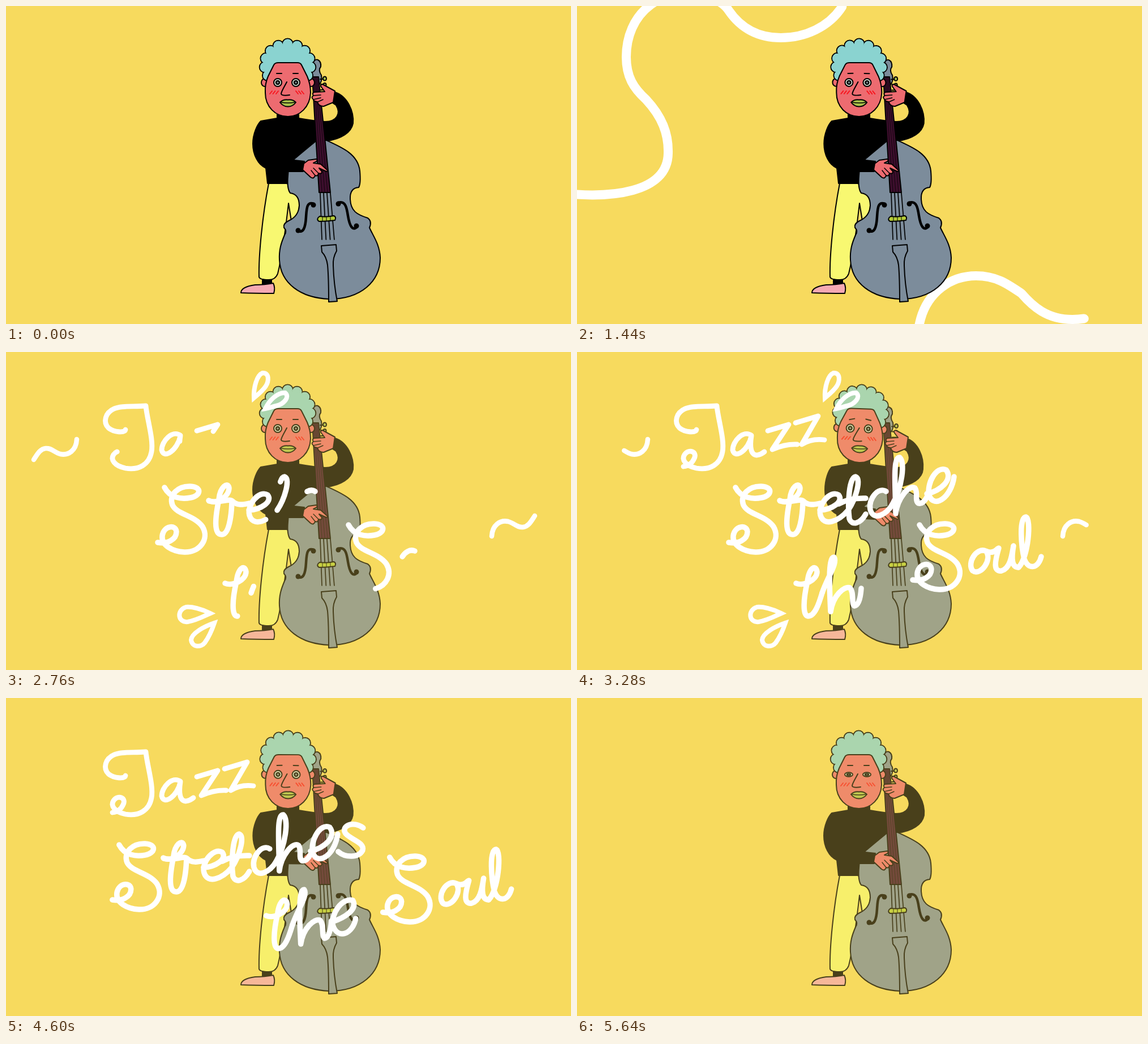
An HTML page with a canvas that plays this animation: 998x561 px, repeating every 5680 ms.

```html
<!DOCTYPE html>
<html lang="en">
<head>
<meta charset="utf-8">
<title>Jazz Stretches the Soul</title>
<style>
html, body { margin: 0; width: 100%; height: 100%; overflow: hidden; background: #f7da5e; }
canvas { display: block; width: 998px; height: 561px; }
</style>
</head>
<body>
<canvas id="stage" width="998" height="561" role="img" aria-label="Jazz Stretches the Soul"></canvas>
<script>
const W = 998, H = 561, LOOP = 5680;
const INK = '#000', SKIN = '#ed6b70', GREY = '#7c8c9b', LIME = '#a8c04a', HAIR = '#8ad3d0';
const ctx = document.getElementById('stage').getContext('2d');
const layer = document.createElement('canvas');
layer.width = W; layer.height = H;
const man = layer.getContext('2d');

const clamp = x => Math.max(0, Math.min(1, x));
const smooth = x => { x = clamp(x); return x * x * (3 - 2 * x); };
const span = (t, a, b) => clamp((t - a) / (b - a));

// Smooth interpolation through [time, value] pairs
function keys(t, list) {
  let [a, v] = list[0];
  for (const [b, w] of list) {
    if (t <= b) return b === a ? w : v + (w - v) * smooth((t - a) / (b - a));
    a = b; v = w;
  }
  return v;
}

function measure(d) {
  const el = document.createElementNS('http://www.w3.org/2000/svg', 'path');
  el.setAttribute('d', d);
  return el.getTotalLength();
}
const stroke = d => ({ path: new Path2D(d), len: measure(d) });

// Draws the part of a stroke between two lengths
function trim(s, from, to, width) {
  from = Math.max(0, from); to = Math.min(s.len, to);
  if (to - from < 0.5) return;
  ctx.lineWidth = width;
  if (from > 0 || to < s.len) {
    ctx.setLineDash([to - from, s.len * 2]);
    ctx.lineDashOffset = -from;
  }
  ctx.stroke(s.path);
  ctx.setLineDash([]);
}

// --- background ribbons -------------------------------------------------
function ribbon(main, rest) {
  return { ...stroke(main + rest), shown: measure(main) };
}
const ribbons = [
  ribbon('M330 620C420 540 400 450 352 405C330 385 318 350 318 322C318 260 360 212 415 212' +
    'C480 212 500 290 590 290C670 290 712 240 712 185C712 140 680 105 652 80' +
    'C625 45 608 15 604 -10C590 -60 500 -60 472 -5C450 35 405 56 360 56' +
    'C320 56 290 40 268 8C250 -20 180 -40 130 -2C100 20 87 55 87 90' +
    'C87 125 100 145 122 165C150 195 162 225 161 260', 'C160 330 60 340 -30 330'),
  ribbon('M1030 160L998 161C930 162 888 195 888 245C888 285 910 315 935 345' +
    'C975 380 998 410 998 450C998 510 940 553 875 553C830 553 805 530 785 507' +
    'C760 490 740 476 705 476C660 476 620 505 607 552', 'C600 580 596 600 590 620')
];
function drawRibbons(t) {
  if (t > 1800) return;
  for (const r of ribbons) trim(r, r.len * span(t, 950, 1790), r.shown * t / 720, 16);
}

// --- lettering ----------------------------------------------------------
const bigS = (dx, dy) => ('M280 239C290 258 310 260 326 257C344 254 347 238 326 237' +
  'C304 236 287 252 294 270C302 287 333 288 347 308C360 330 342 354 315 353' +
  'C294 352 274 341 276 324C279 306 300 304 301 317C301 331 285 339 268 336')
  .replace(/(\d+) (\d+)/g, (_, x, y) => `${+x + dx} ${+y + dy}`);

const word = list => list.map(([start, dur, d]) => ({ start, dur, ...stroke(d) }));
const words = [
  { slope: -0.25, width: 8.8, move: [[4700, 0], [5000, 46], [5400, -540]],
    parts: word([
      [2220, 620, 'M211 137C210 143 191 142 181 134C171 124 175 107 191 100C205 94 225 97 247 95C249 118 261 155 257 176C253 199 234 209 211 205C192 201 184 190 190 181C198 170 213 176 207 188C203 197 197 201 188 202'],
      [2460, 420, 'M308 147C294 137 275 157 275 173C279 190 303 173 308 148C305 168 307 182 318 182Q325 181 331 176'],
      [2620, 360, 'M337 139L374 128L345 172Q368 162 389 163'],
      [2780, 360, 'M386 125L426 113L397 163Q415 152 437 155']
    ]) },
  { slope: -0.25, width: 9.5, move: [[4000, 0], [4840, -100], [5350, 900]],
    parts: word([
      [2060, 520, bigS(0, 0)],
      [1960, 320, 'M358 262C372 270 394 255 394 240C392 228 378 238 376 260C370 290 366 322 381 322C394 322 398 290 399 265'],
      [2320, 220, 'M359 263C378 268 393 257 400 263C409 272 420 269 430 267'],
      [2440, 380, 'M429 279C450 278 472 264 462 252C447 243 425 270 430 288C436 309 462 299 479 279'],
      [2600, 380, 'M479 279C492 260 503 224 492 220C480 221 478 270 481 294C486 308 501 302 510 286'],
      [2780, 160, 'M462 268Q482 257 510 258'],
      [2720, 280, 'M546 246C533 237 514 259 518 278C523 299 547 287 557 269'],
      [2840, 400, 'M557 269C574 240 580 195 570 186C558 185 562 230 563 285C566 258 587 233 597 240C603 248 596 262 603 267Q611 269 618 256'],
      [2960, 320, 'M618 250C642 245 665 225 652 208C635 200 617 232 622 253C631 277 661 257 666 220'],
      [3290, 280, 'M711 209C694 196 671 205 680 219C689 230 715 235 710 249C703 262 680 262 667 251']
    ]) },
  { slope: -0.33, width: 9.5, move: [[4150, 0], [4830, 99], [5390, -980]],
    parts: word([
      [2460, 400, 'M387 408C400 414 424 402 424 388C422 374 410 380 407 405C400 435 398 465 408 466C420 466 427 445 433 425'],
      [2740, 480, 'M433 425C442 398 461 372 454 362C443 361 446 420 448 458C452 430 472 412 482 416C490 424 484 444 490 448Q500 447 502 417'],
      [3300, 280, 'M503 419C525 412 549 397 540 381C522 375 500 405 505 426C514 451 540 440 545 413'],
      [2400, 560, bigS(325, 66)],
      [2700, 300, 'M722 351C706 344 688 372 699 386C713 396 735 365 722 351Q734 357 743 347'],
      [2820, 300, 'M745 346C738 370 735 388 750 386C765 382 768 360 771 342C767 365 768 380 780 380'],
      [2940, 320, 'M780 380C797 363 803 295 793 291C780 292 785 345 790 365C797 385 815 382 820 361']
    ]) }
];
function drawWords(t) {
  if (t > 5410) return;
  for (const w of words) {
    const x = keys(t, w.move);
    ctx.save();
    ctx.translate(x, x * w.slope);
    for (const p of w.parts) trim(p, 0, p.len * span(t, p.start, p.start + p.dur), w.width);
    ctx.restore();
  }
}

// --- drops and squiggles ------------------------------------------------
const drops = [
  [1980, 'M361 461C345 453 328 449 318 450C301 455 303 478 321 476C335 474 350 466 361 461Z'],
  [2200, 'M368 478C350 484 328 496 327 508C329 522 345 521 351 513C359 502 364 490 368 478Z'],
  [2220, 'M438 81C437 63 443 41 453 37C466 36 464 52 459 60C453 69 445 75 438 81Z'],
  [2190, 'M458 100C465 85 480 71 493 72C502 79 491 92 477 95C469 97 464 99 458 100Z']
].map(([start, d]) => ({ start, ...stroke(d) }));
const squiggle = stroke('M125 154C124 174 110 183 96 180C85 177 80 169 70 170C60 171 55 181 49 190');

function drawAccents(t) {
  ctx.lineJoin = 'miter';
  for (const d of drops)
    trim(d, d.len * span(t, 3650, 3900), d.len * span(t, d.start, d.start + 200), 8);
  ctx.lineJoin = 'round';
  const shown = keys(t, [[2280, 0], [2900, 1.5], [3020, 1.5], [3260, .57], [3320, .57], [3600, 0]]);
  for (const turn of [0, Math.PI]) {
    ctx.save();
    ctx.translate(491.5, 239.5);
    ctx.rotate(turn);
    ctx.translate(-491.5, -239.5);
    trim(squiggle, 0, squiggle.len * shown, 8.5);
    ctx.restore();
  }
}

// --- musician -----------------------------------------------------------
function shape(d, fill, line = 2, color = INK) {
  const p = new Path2D(d);
  if (fill) { man.fillStyle = fill; man.fill(p); }
  if (line) { man.lineWidth = line; man.strokeStyle = color; man.stroke(p); }
}
function oval(x, y, rx, ry, fill, line = 2) {
  man.beginPath();
  man.ellipse(x, y, rx, ry, 0, 0, 7);
  man.fillStyle = fill;
  man.fill();
  if (line) { man.lineWidth = line; man.strokeStyle = INK; man.stroke(); }
}
function shifted(x, y, draw) {
  man.save();
  man.translate(x, y);
  draw();
  man.restore();
}

function drawLegs() {
  shape('M453 480H469V493H453Z', INK);
  shape('M464 313H497L503 329Q519 332 518 352Q517 370 504 379L499 348C494 392 488 440 480 472Q476 483 464 483Q448 483 447 478C446 440 453 370 464 313Z', '#f8f871');
  shape('M415 506C415 498 426 494 440 492Q457 492 472 489Q476 497 473 507Q440 507 415 506Z', '#f6a9b3');
}

function drawTorso(s) {
  const l = 436 + 2 * s, r = 613 - 2 * s;
  shape(`M479 190H517V198Q545 203 564 204C584 204 592 190 583 175L577 171L581 152` +
    `C603 159 ${r + 2} 186 ${r} 207C610 223 592 235 566 238L552 300L498 292V313H462L459 286` +
    `C445 280 ${l} 262 ${l} 243C${l} 225 444 209 450 203L479 198Z`, INK);
}

function drawBass(s) {
  shifted(s, 2.5 * s, () => {
    shape('M541 126V101Q546 93 551 95Q557 98 556 107Q551 113 557 122Q559 133 553 139Z', GREY);
    shape('M555 129H561M556 138H562M556 148H563');
    oval(563, 128, 3, 3.5, LIME);
    oval(563, 139, 2.5, 3, LIME);
  });
  shape('M549 237Q527 255 508 271Q498 281 498 300Q496 322 502 330Q518 332 518 352Q517 371 499 379' +
    'Q489 384 491 391Q497 397 492 404C486 418 482 430 483 448C485 489 520 515 571 517' +
    'C627 517 661 486 661 444C660 420 648 405 642 391Q647 380 639 374C620 368 609 362 608 341' +
    'Q607 321 623 320Q627 313 625 291C622 262 595 250 566 237Z', GREY);
  shape('M541 125H552L573 329H553Z', '#3d0e2d');
  for (let i = 0; i < 4; i++) {
    if (i < 3) shape(`M${544 + i * 2.6} 126L${558 + i * 5} 328`, null, 1.1, '#14070f');
    shape(`M${555 + i * 6} 330L${558 + i * 7.3} 412`, null, 1.7);
  }
  shape('M554 371Q566 373 579 370Q584 372 581 378Q566 380 553 380Q547 376 554 371Z', '#b5cc38');
  shape('M559 372V379M566 372V379M573 371V378', null, 1);
  shape('M557 423L583 421L584 432Q577 444 578 458Q579 490 585 521L570 522Q570 480 568 457Q566 442 558 434Z', GREY);
  shape('M544 349C531 344 531 358 530 372C529 391 525 402 515 396', null, 4.5);
  shape('M587 347C600 343 602 357 604 370C607 389 613 398 620 389', null, 4.5);
  for (const [x, y] of [[543, 351], [516, 396], [587, 349], [619, 388]]) oval(x, y, 4.5, 4.5, INK, 0);
}

function drawHands(s, p) {
  shifted(4 * s, 0, () => {
    shape('M581 150L570 144L559 138Q554 139 557 143L563 151L544 152Q540 154 543 158Q538 161 543 165Q543 168 550 169Q552 177 561 177L578 170Z', SKIN);
    shape('M543 158L556 157M543 165L556 162M551 169L560 165', null, 1.5);
  });
  // Forearm follows the plucking hand
  const y = 12 * p;
  shape(`M460 258L${500 - 6 * p} ${271 + y * .4}L527 ${274 + y}L525 ${292 + y}L497 ${292 + y * .4}L459 285Z`, INK);
  shifted(0, y, () => {
    shape('M526 278L534 272L548 270Q552 272 547 275L543 277L556 279L566 288Q570 291 566 292L553 286L558 292Q558 297 552 295Q551 301 546 299Q544 306 538 302L524 289Z', SKIN);
    shape('M543 286L552 295M539 290L546 299', null, 1.5);
  });
}

function drawHead(s, open, o) {
  man.save();
  man.translate(498, 200);
  man.rotate(0.04 * s);
  man.translate(-498, -200);

  oval(457, 135, 6, 7, SKIN);
  oval(539, 135, 6, 7, SKIN);
  // Curls: outlined circles first, plain ones on top
  for (const [r, line] of [[9.5, 2], [8.5, 0]])
    for (let k = -5; k <= 5; k++) {
      const a = k * Math.PI * 2 / 15;
      oval(497.5 + 40.5 * Math.sin(a), 104 - 37 * Math.cos(a), r, r, HAIR, line);
    }
  oval(497.5, 105, 41, 37, HAIR, 0);
  shape('M463 124L473 104Q475 100 481 100H515Q520 100 522 104L532 124Q538 138 538 153C537 178 519 195 498 195C476 195 458 178 458 153Q457 138 463 124Z', SKIN);

  for (const x of [480, 512]) {
    oval(x, 135, 7, Math.max(.8, 7 * open), '#ccd8cd');
    oval(x, 135, 3, Math.max(.5, 3 * open), '#78858a', 2.4);
  }
  shape(`M478 ${119 + s}L487 ${119 - s}M507 ${119 - s}L516 ${119 + s}`);
  shape('M496 134C493 140 486 151 486 155Q487 159 501 157');
  for (let i = 0; i < 3; i++)
    shape(`M${466 + i * 5.5} 155l4 -5M${512 + i * 5} 150l4 5`, null, 2, '#f8161f');

  const w = 14 - 5 * o, h = 6.5 + 1.5 * o, my = 171;
  shape(`M${498 - w} ${my - 1}Q${498 - w * .6} ${my - h} 498 ${my - h + 1}Q${498 + w * .6} ${my - h} ${498 + w} ${my - 1}` +
    `Q${498 + w * .6} ${my + h} 498 ${my + h}Q${498 - w * .6} ${my + h} ${498 - w} ${my - 1}Z`, LIME);
  shape(`M${498 - w + 2} ${my - 1}Q498 ${my + 1 - 4 * o} ${498 + w - 2} ${my - 1}`, null, 1.5);
  man.restore();
}

const sway = [[0, 0], [420, 1], [760, 1], [1110, -.1], [1320, 0], [1600, .4], [1900, 0], [2230, 0], [2400, .4], [2560, 0]];
const pluck = [[0, 0], [300, 0], [720, 1], [1400, 0], [1700, 0], [2050, .5], [2200, 0]];
const blinks = [780, 4020, 5700];
const mouth = [[3680, 0], [3920, 1], [4020, 1], [4260, 0]];

function drawMan(t) {
  const beat = t % (LOOP / 2);
  const s = keys(beat, sway), p = keys(beat, pluck);
  const open = Math.min(...blinks.map(b => clamp(Math.abs(t - b) / 110)));
  man.clearRect(0, 0, W, H);
  man.lineJoin = man.lineCap = 'round';
  drawLegs();
  drawTorso(s);
  drawBass(s);
  drawHead(s, open, keys(t, mouth));
  drawHands(s, p);
  ctx.globalAlpha = 1 - 0.3 * span(t, 1700, 2100);
  ctx.drawImage(layer, 0, 0);
  ctx.globalAlpha = 1;
}

function frame() {
  const t = Math.floor(performance.now() % LOOP / 40) * 40;
  ctx.fillStyle = '#f7da5e';
  ctx.fillRect(0, 0, W, H);
  ctx.strokeStyle = '#fff';
  ctx.lineCap = ctx.lineJoin = 'round';
  drawRibbons(t);
  drawMan(t);
  drawWords(t);
  drawAccents(t);
  requestAnimationFrame(frame);
}
frame();
</script>
</body>
</html>
```
